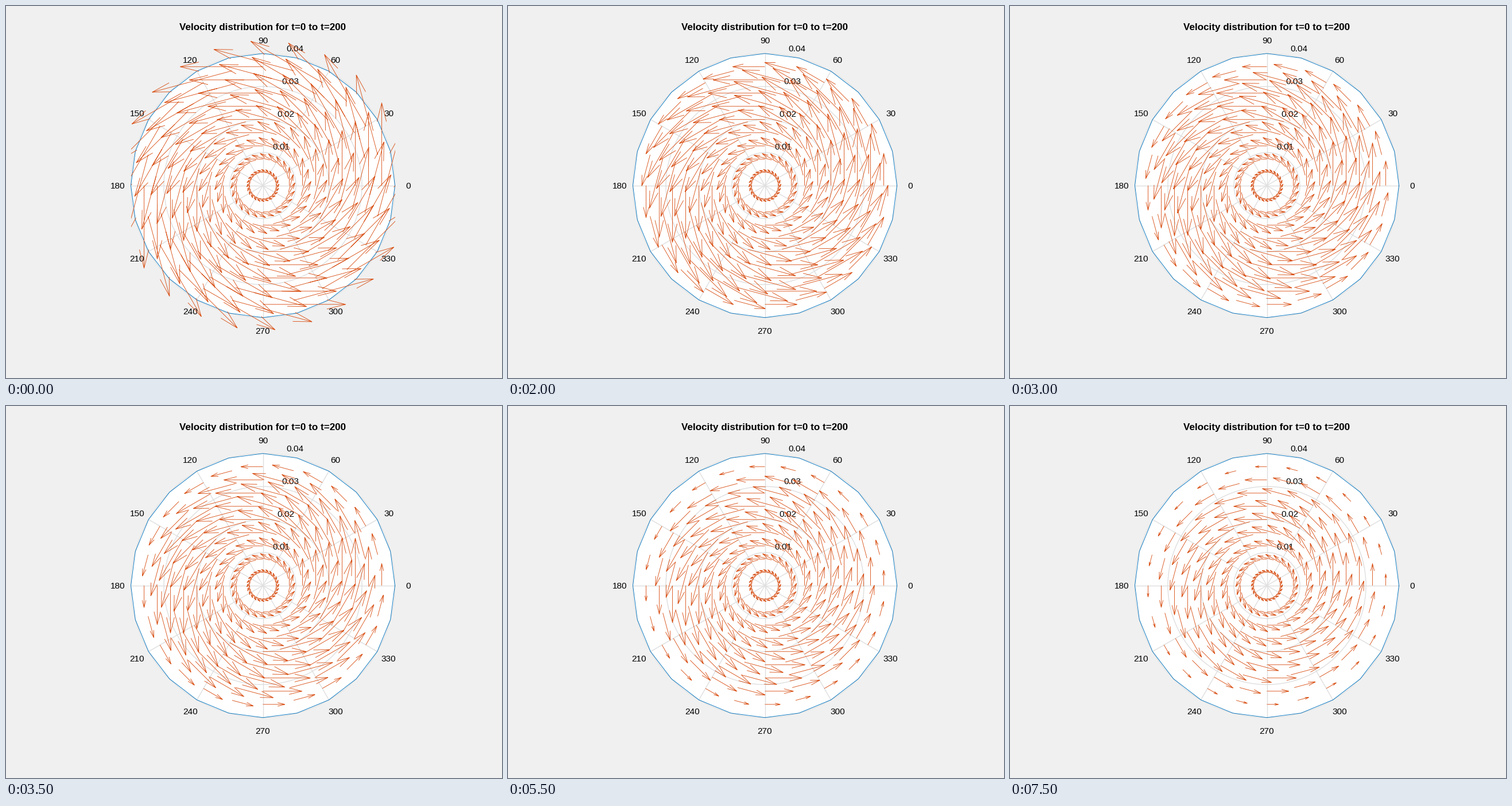
A matplotlib script for the animation above (8000 ms loop, 864 by 648 pixels).

```python
import numpy as np
import matplotlib.pyplot as plt
from matplotlib.animation import FuncAnimation
from matplotlib.patches import Circle, Rectangle

plt.rcParams["font.family"] = "Liberation Sans"
plt.rcParams["path.simplify"] = False

W, H, DPI = 864, 648, 72
FRAMES, INTERVAL = 16, 500
CX, CY, R = 447.5, 312.75, 230
RINGS, SPOKES = 10, 24
BLUE, ORANGE, GRID, PAPER = "#0072bd", "#d95319", "#dfdfdf", "#f0f0f0"

fig = plt.figure(figsize=(W / DPI, H / DPI), dpi=DPI, facecolor=PAPER)
ax = fig.add_axes([0, 0, 1, 1])
ax.set_xlim(0, W)
ax.set_ylim(H, 0)
ax.axis("off")


def polar(r, deg):
    a = np.radians(deg)
    return CX + r * np.cos(a), CY - r * np.sin(a)


def label(x, y, s, size=15.4, **kw):
    # y is the middle of the digits
    ax.text(x, y + 0.358 * size, s, fontsize=size, ha="center",
            va="baseline", color="black", zorder=3, **kw)


# Polar grid
ax.add_patch(Circle((CX, CY), R, fc="white", ec=GRID, lw=1.2, zorder=1))
for i in (1, 2, 3):
    ax.add_patch(Circle((CX, CY), R * i / 4, fill=False, ec=GRID, lw=1.4, zorder=2))
for deg in range(0, 180, 30):
    (x0, y0), (x1, y1) = polar(R, deg), polar(-R, deg)
    ax.plot([x0, x1], [y0, y1], color=GRID, lw=1.4, zorder=2)
for deg in range(0, 360, 30):
    label(*polar(1.1 * R, deg), str(deg))
for i in range(1, 5):
    label(471.4 + 8 * i, 301 - 56.9 * i, f"{i / 100:.2f}")
label(CX, 35.9, "Velocity distribution for t=0 to t=200", 17, weight="bold")

# Outer wall
ax.plot(*polar(R, np.linspace(0, 360, SPOKES + 1)), color=BLUE, lw=0.9, zorder=4)

# Viscous decay of a solid-body swirl with a wall at rest:
# u_t = nu (u_rr + u_r / r - u / r^2), solved on the rings
k = np.arange(1, RINGS)
lap = (np.diag(-2 - 1 / k**2)
       + np.diag((1 + 0.5 / k)[:-1], 1)
       + np.diag((1 - 0.5 / k)[1:], -1))
SUB = 200
step = np.linalg.matrix_power(np.eye(len(k)) + 0.3125 / SUB * lap, SUB)
start_speed = 16.0 * k

ring, theta = np.meshgrid(k, np.radians(np.arange(SPOKES) * 360 / SPOKES))
ring, theta = ring.ravel(), theta.ravel()
base = np.column_stack([CX + 23 * ring * np.cos(theta), CY - 23 * ring * np.sin(theta)])
along = np.column_stack([-np.sin(theta), -np.cos(theta)])
across = np.column_stack([np.cos(theta), -np.sin(theta)])
gap = np.full_like(base, np.nan)

arrows, = ax.plot([], [], color=ORANGE, lw=0.9, solid_joinstyle="bevel",
                  solid_capstyle="butt", zorder=5)
arrows.set_clip_path(Rectangle((CX - R, 0), 2 * R, H, transform=ax.transData))


def update(n):
    speed = np.linalg.matrix_power(step, n) @ start_speed
    length = speed[ring - 1][:, None]
    head = np.minimum(0.33 * length, 32.5)
    tip = base + length * along
    neck = tip - head * along
    side = 0.25 * head * across
    pts = np.stack([base, tip, gap, neck + side, tip, neck - side, gap], axis=1)
    arrows.set_data(*pts.reshape(-1, 2).T)
    return arrows,


anim = FuncAnimation(fig, update, frames=FRAMES, interval=INTERVAL,
                     repeat=True, repeat_delay=0, blit=False)
plt.show()
```
